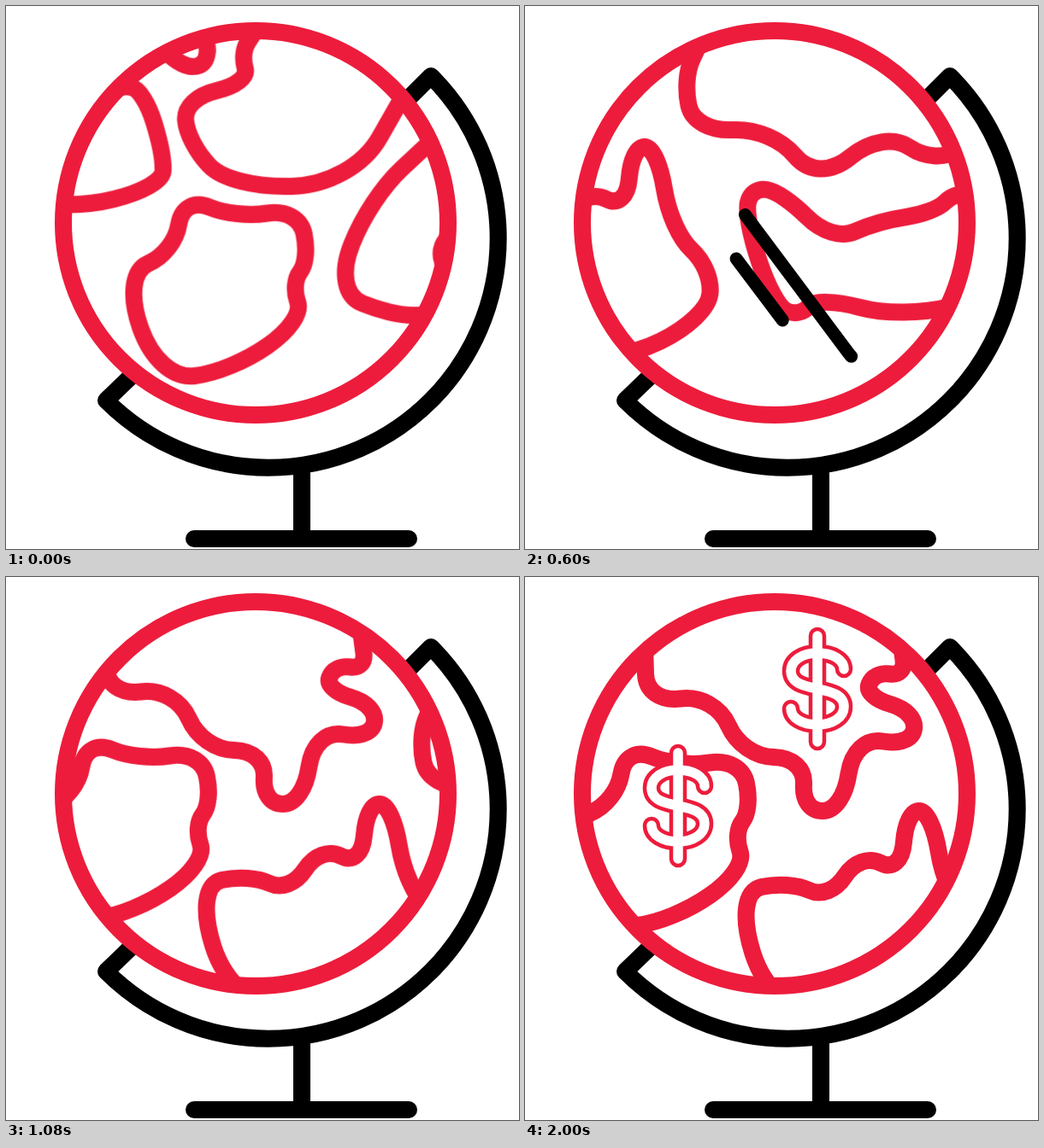
Animation, 600 px wide and 636 px high, one loop 2040 ms. Source, as an HTML page:

```html
<!DOCTYPE html>
<html lang="en">
<head>
<meta charset="utf-8">
<title>Spinning globe</title>
<style>
  html, body { margin: 0; width: 100%; height: 100%; overflow: hidden; background: #fff; }
  svg { display: block; width: 600px; height: 636px; }
  path, circle { fill: none; stroke-linecap: round; stroke-linejoin: round; stroke-width: 20; }
  .red { stroke: #ed1c3c; }
  .black { stroke: #000; }
  .streak { stroke-width: 15; visibility: hidden; }
  #sign { stroke: inherit; stroke-width: inherit; }
  .outline { stroke: #ed1c3c; stroke-width: 20.5px; }
  .inside { stroke: #fff; stroke-width: 11.5px; }

  #map { animation: spin 2040ms linear infinite; }
  .leave { animation: leave 2040ms linear infinite; }
  @keyframes spin {
    54.902%, 100% { transform: translate(693px, 235px); }
  }
  @keyframes leave {
    0%, 54.85% { opacity: 1; }
    54.86%, 100% { opacity: 0; }
  }
</style>
</head>
<body>
<svg viewBox="0 0 600 636">
  <defs>
    <clipPath id="ball"><circle cx="292" cy="254" r="230"/></clipPath>
    <path id="sign" d="M0-62V62M31-23C31-34 18-42 0-42S-31-33-31-21C-31-6-14-3 0 0S31 6 31 21C31 33 18 42 0 42S-31 34-31 23"/>
    <g id="dollar">
      <use href="#sign" class="outline"/>
      <use href="#sign" class="inside"/>
    </g>
  </defs>

  <path class="black" d="M470 109L497 82A268.7 268.7 0 0 1 117 462L146 434M346 541V624M220 624H471"/>
  <circle cx="292" cy="254" r="225" style="fill:#fff"/>
  <g clip-path="url(#ball)"><g id="map"></g></g>
  <circle class="red" cx="292" cy="254" r="225"/>

  <path id="long" class="black streak" d="M113 51L378 406C398 432 421 427 433 449Q444 468 444 485"/>
  <path id="short" class="black streak" d="M172 196L320 393"/>

  <use id="coin1" href="#dollar"/>
  <use id="coin2" href="#dollar"/>
</svg>
<script>
  const LOOP = 2040;
  const byId = id => document.getElementById(id);
  const mix = (a, b, k) => a.map((v, i) => v + (b[i] - v) * k);
  const clamp = v => Math.max(0, Math.min(1, v));

  // Polygon with every corner rounded from edge middle to edge middle.
  function rounded(pts, closed) {
    const n = pts.length;
    const corners = closed ? pts : pts.slice(1, -1);
    let d = 'M' + (closed ? mix(pts[n - 1], pts[0], .5) : pts[0]);
    corners.forEach((p, i) => {
      const k = closed ? i : i + 1;
      const from = mix(pts[(k + n - 1) % n], p, .5);
      const to = mix(p, pts[(k + 1) % n], .5);
      d += `L${from}C${mix(from, p, .6)} ${mix(to, p, .6)} ${to}`;
    });
    return d + (closed ? 'Z' : 'L' + pts[n - 1]);
  }

  // Corners are given as they lie on the stage when the map has moved by (x, y).
  function land(x, y, closed, corners, cls = '') {
    const path = document.createElementNS('http://www.w3.org/2000/svg', 'path');
    const pts = corners.split(' ').map(p => p.split(',').map(Number));
    path.setAttribute('d', rounded(pts, closed));
    path.setAttribute('class', 'red ' + cls);
    path.setAttribute('transform', `translate(${-x} ${-y})`);
    byId('map').append(path);
  }

  const island = '207,223 268,248 342,237 354,297 333,325 348,368 262,428 178,438 135,315 196,288';
  land(0, 0, true, island);
  land(782, 260, true, island);
  land(0, 0, false, '290,30 274,55 284,90 207,108 212,160 262,213 405,209 468,98');
  land(0, 0, false, '500,155 425,225 382,334 450,362 500,362');
  land(0, 0, false, '530,255 500,290 530,325');
  land(371, 126, false, '205,40 184,85 197,147 288,143 342,208 418,145 480,186 533,150 578,203 614,188 588,125', 'leave');
  land(371, 126, true, '264,212 300,218 358,276 412,252 478,242 503,217 532,225 555,300 553,338 440,366 342,340 320,364 290,350 256,248');
  land(569, 193, true, '322,232 352,232 368,330 416,375 411,432 300,487 165,470 120,328 185,314 232,336 268,281 316,305');
  land(693, 235, false, '140,80 142,147 222,138 254,210 328,212 324,274 372,274 385,187 452,198 458,158 397,140 408,111 445,116 440,78');

  // Shows the part of a path between its travelling tail and head.
  function streak(id, t, headStart, headEnd, tailStart, tailEnd) {
    const path = byId(id);
    const length = path.getTotalLength();
    const head = length * clamp((t - headStart) / (headEnd - headStart));
    const tail = length * clamp((t - tailStart) / (tailEnd - tailStart));
    path.style.visibility = head > tail ? 'visible' : 'hidden';
    path.style.strokeDasharray = `${head - tail} 2000`;
    path.style.strokeDashoffset = -tail;
  }

  // Damped spring from 0 to full size.
  function pop(id, x, y, age) {
    const u = Math.max(0, age);
    const size = 1 - Math.exp(-.0095 * u) * Math.cos(Math.PI * u / 170);
    byId(id).setAttribute('transform', `translate(${x} ${y}) scale(${size})`);
  }

  let start;
  function draw(now) {
    start ??= now;
    const t = (now - start) % LOOP;
    streak('long', t, 80, 720, 320, 960);
    streak('short', t, 118, 670, 320, 872);
    pop('coin1', 342, 131, t - 1120);
    pop('coin2', 179, 268, t - 1160);
    requestAnimationFrame(draw);
  }
  requestAnimationFrame(draw);
</script>
</body>
</html>
```
